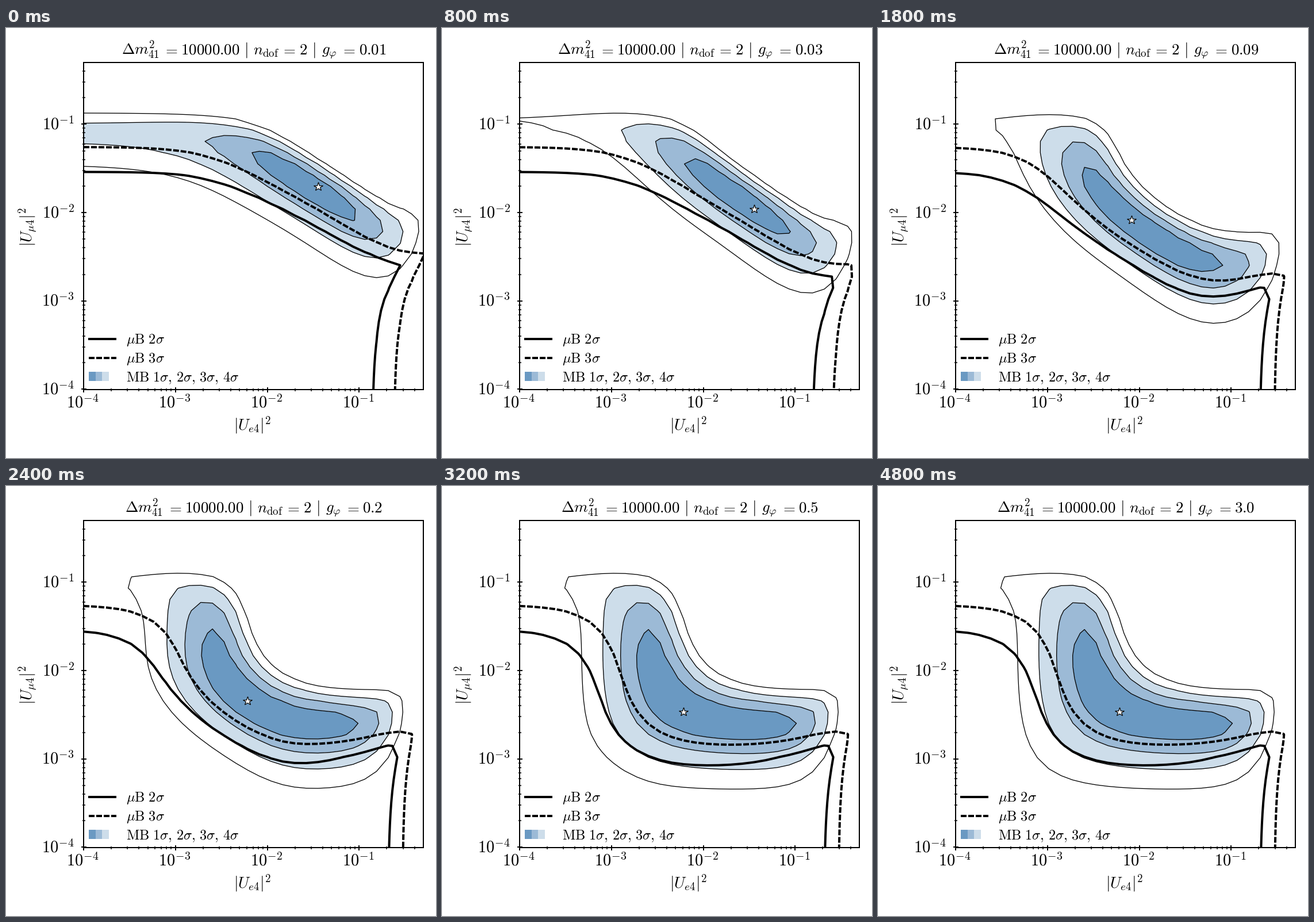
Recreate the animation shown at these times as a matplotlib script. Size 748 px wide and 748 px high, loop 5000 ms.

```python
import numpy as np
import matplotlib.pyplot as plt
from matplotlib.animation import FuncAnimation
from matplotlib.patches import Rectangle

plt.rcParams["mathtext.fontset"] = "cm"
plt.rcParams["lines.dashed_pattern"] = (2.5, 0.75)

SIZE = 748
FRAMES, INTERVAL = 25, 200
LEFT, RIGHT, TOP, BOTTOM = 135, 726, 60, 628.5
SPAN = np.log10(0.5) + 4                 # decades on each axis
DEC_X, DEC_Y = (RIGHT - LEFT) / SPAN, (BOTTOM - TOP) / SPAN
BLUES = ["#6a99c2", "#9cbad6", "#cdddea"]
EM, TICK_EM, LEGEND_EM = 27, 28.4, 24.3

# Parameter scan, log-spaced over the whole plot
N = 30
decades = np.linspace(0, SPAN, N)
px, py = LEFT + DEC_X * decades, BOTTOM - DEC_Y * decades
X, Y = np.meshgrid(10 ** (decades - 4), 10 ** (decades - 4))

SIGMA = [2.30, 6.18, 11.83, 19.33]       # 1 to 4 sigma for two parameters

# Best-fit cell on the scan grid at a few steps
STEPS = [0, 4, 7, 9, 12, 16]
BEST_X = [20, 20, 18, 15, 14, 14]
BEST_Y = [18, 16, 15, 15, 13, 12]


def coupling(i):
    return 0.01 * 10 ** (0.1035 * i)


def signal(G):
    """Appearance rate: mixing times branching times decay probability."""
    decay = 1 - np.exp(-(4 + 58 * G) * (0.6 * X + Y))
    return 1e4 * X * Y / (X + Y) * decay


def chi2_mb(G):
    """Fit to an excess, with a penalty on large mixings."""
    rate = signal(G) / (1 + 6 * X**2) + 780 * Y**2 + 160 * np.exp(-33 * G) * Y
    h = 1 - np.exp(-G / 2)
    chi2 = (61 * (np.sqrt(rate / 23.5) - 1) ** 2 + 67 * Y + 641 * Y**2
            + (1 - h) * 48 * X + h * 215 * X**2)
    return chi2 - chi2.min()


def chi2_ub(G):
    """Null result: appearance partly cancelled by disappearance."""
    h = 1 - np.exp(-G / 0.3)
    n = signal(G) - 50 * X
    n = np.where(n < 0, (0.7 - 0.3 * h) * n, n)
    return (n**2 / (2.44 + 0.9 * abs(n)) + 212 * Y
            + (1 - h) * 20 * X + h * 80 * X**2)


fig = plt.figure(figsize=(SIZE / 72, SIZE / 72), dpi=72, facecolor="white")
ax = fig.add_axes([LEFT / SIZE, 1 - BOTTOM / SIZE,
                   (RIGHT - LEFT) / SIZE, (BOTTOM - TOP) / SIZE])


def label(x, y, s, size=EM, **kw):
    return ax.text(x, y, f"${s}$", fontsize=size, **kw)


# Log axes in pixel units
major = np.arange(4)
minor = np.array([e + np.log10(m) for e in major for m in range(2, 10)])
minor = minor[minor < SPAN - 0.01]
ax.set_xticks(LEFT + DEC_X * major)
ax.set_xticks(LEFT + DEC_X * minor, minor=True)
ax.set_yticks(BOTTOM - DEC_Y * major)
ax.set_yticks(BOTTOM - DEC_Y * minor, minor=True)
ax.set_xlim(LEFT, RIGHT)
ax.set_ylim(BOTTOM, TOP)
ax.tick_params(which="both", direction="inout", labelbottom=False, labelleft=False)
ax.tick_params(which="major", length=9, width=1.9)
ax.tick_params(which="minor", length=5, width=1.5)
for spine in ax.spines.values():
    spine.set_linewidth(2)
for e in major:
    power = f"10^{{{e - 4}}}"
    label(LEFT + DEC_X * e - 1.5, 661, power, TICK_EM, ha="center")
    label(118.5, BOTTOM - DEC_Y * e + 9, power, TICK_EM, ha="right")
label(428.5, 691, r"|U_{e4}|^2", ha="center", va="center")
label(39, 346, r"|U_{\mu 4}|^2", ha="center", va="center", rotation=90)

# Legend
ax.plot([143, 192], [541, 541], "k-", lw=4, solid_capstyle="butt")
ax.plot([143.5, 192], [574, 574], "k--", lw=4)
for k, color in enumerate(BLUES):
    ax.add_patch(Rectangle((144 + 11.7 * k, 598), 11.7, 16.5, fc=color, lw=0))
names = [r"\mu\mathrm{B}\ 2\sigma", r"\mu\mathrm{B}\ 3\sigma",
         r"\mathrm{MB}\ 1\sigma,\,2\sigma,\,3\sigma,\,4\sigma"]
for k, name in enumerate(names):
    label(209, 549 + 33 * k, name, LEGEND_EM)

# Title parts: x, alignment, text
PARTS = [(200.5, "left", r"\Delta m^2_{41}"), (286, "center", "="),
         (304, "left", "10000.00"), (417.5, "center", "|"),
         (430, "left", r"n_{\mathrm{dof}}"), (491.5, "center", "="),
         (510, "left", "2"), (535, "center", "|"),
         (549, "left", r"g_{\varphi}"), (595.5, "center", "="),
         (613.5, "left", "0.01")]
title = [label(x, 46, s, ha=ha) for x, ha, s in PARTS]

star, = ax.plot([], [], "*", ms=16, mfc="white", mec="k", mew=1.2, zorder=4)
drawn = []


def draw(i):
    while drawn:
        drawn.pop().remove()
    g = coupling(i)
    G = (g / coupling(9)) ** 2
    mb, ub = chi2_mb(G), chi2_ub(G)
    drawn.extend([
        ax.contourf(px, py, mb, [-1] + SIGMA[:3], colors=BLUES, zorder=1),
        ax.contour(px, py, mb, SIGMA, colors="k", linewidths=1.3, zorder=1.5),
        ax.contour(px, py, ub, SIGMA[1:2], colors="k", linewidths=4,
                   linestyles="solid", zorder=2),
        ax.contour(px, py, ub, SIGMA[2:3], colors="k", linewidths=4,
                   linestyles="dashed", zorder=2),
    ])
    cx, cy = (int(round(np.interp(i, STEPS, b))) for b in (BEST_X, BEST_Y))
    star.set_data([px[cx]], [py[cy]])

    value = str(float(f"{g:.1g}"))
    title[-1].set_text(f"${value}$")
    shift = EM / 4 * (4 - len(value))
    for part, (x0, _, _) in zip(title, PARTS):
        part.set_x(x0 + shift)
    return []


anim = FuncAnimation(fig, draw, frames=FRAMES, interval=INTERVAL,
                     repeat=True, repeat_delay=0, blit=False)
plt.show()
```
